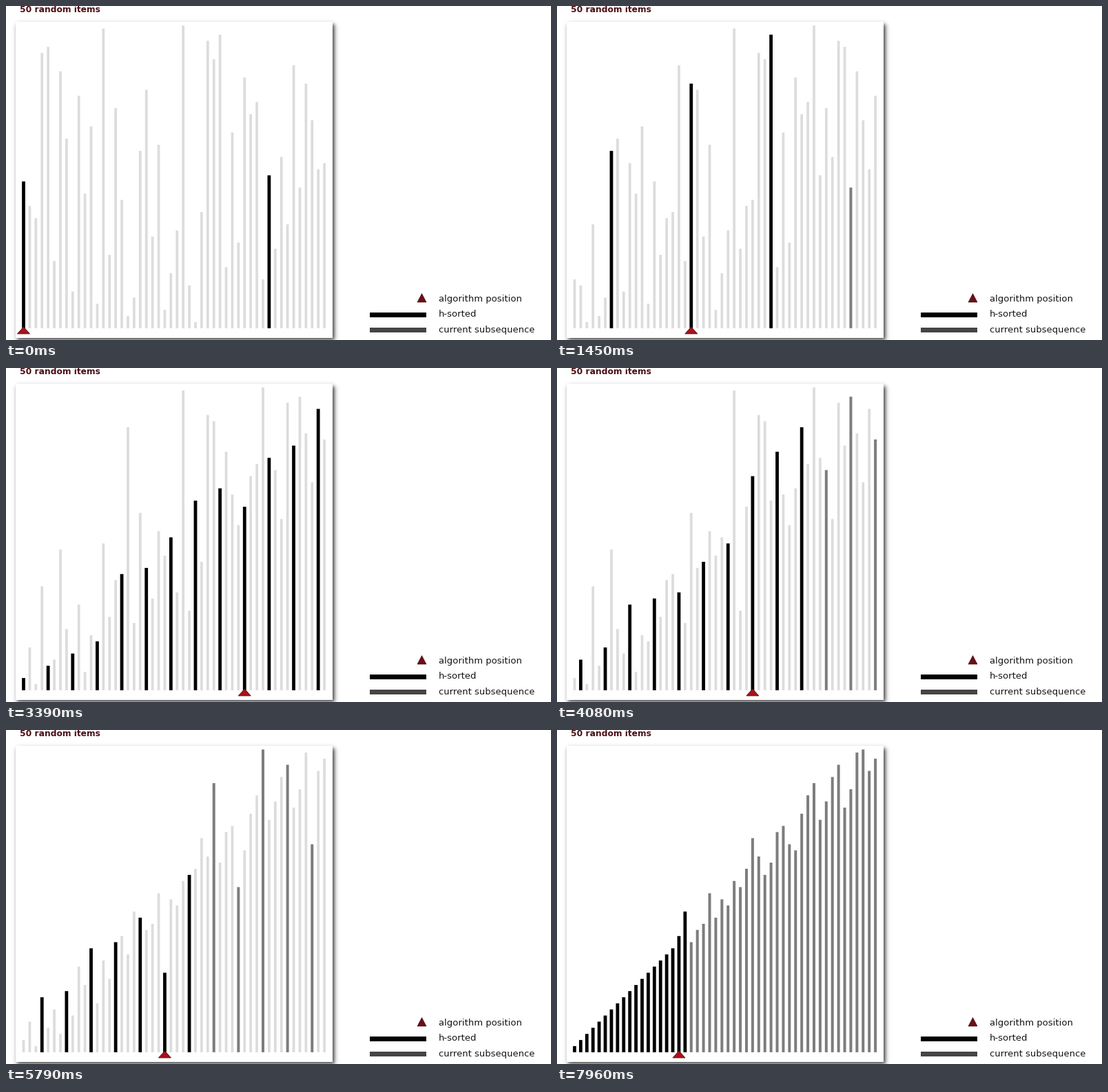
Animation, 791 px wide and 486 px high, one loop 8000 ms. Source, as a matplotlib script:

```python
import numpy as np
import matplotlib.pyplot as plt
from matplotlib.animation import FuncAnimation
from matplotlib.collections import LineCollection

W, H, DPI = 791, 486, 64          # a power of two keeps the pixel size exact
PT = 72 / DPI                     # points per pixel
INTERVAL, FRAMES = 20, 400
FIRST_STEP, STEP = 60, 77.45      # ms

BASE, UNIT = 468.9, 8.9
LIGHT, MID, BLACK = "#dcdcdc", "#7d7d7d", "#000000"
RED, MAROON = "#a8121c", "#5c0d12"

ITEMS = [24, 20, 18, 45, 46, 11, 42, 31, 6, 38, 22, 33, 4, 49, 12, 36, 21,
         2, 5, 29, 39, 15, 30, 3, 9, 16, 50, 7, 1, 19, 47, 44, 48, 10, 32,
         14, 41, 35, 37, 8, 25, 13, 28, 17, 43, 23, 40, 34, 26, 27]
COUNT = len(ITEMS)


def shell_sort(items):
    """Yield (items, gap, newest index, pointer) after every comparison."""
    a = list(items)
    for gap in (40, 13, 4, 1):
        for start in range(gap):
            for i in range(start + gap, len(a), gap):
                for j in range(i, gap - 1, -gap):
                    swap = a[j] < a[j - gap]
                    if swap:
                        a[j], a[j - gap] = a[j - gap], a[j]
                    yield tuple(a), gap, i, j - gap
                    if not swap:
                        break


STATES = list(shell_sort(ITEMS))


def state_at(ms):
    """Two comparisons per step, with short rests between passes."""
    k = max(0, int((ms - FIRST_STEP) // STEP) + 1)
    rests = sum(k > r for r in (30, 36, 81, 82)) + (k == 37)
    return STATES[2 * k - rests]


def bar_x(i):
    return 25.5 + 8.91 * i


def triangle(x, top, bottom, half):
    return [(x - half, bottom), (x + half, bottom), (x, top)]


def soft_box(x0, x1, y0, y1, blur):
    """Opacity of a blurred rectangle over the whole stage."""
    def ramp(n, lo, hi):
        p = np.arange(n) + 0.5
        rise = lambda d: 1 / (1 + np.exp(-1.7 * d / blur))
        return rise(p - lo) * rise(hi - p)
    return np.outer(ramp(H, y0, y1), ramp(W, x0, x1))


fig = plt.figure(figsize=(W / DPI, H / DPI), dpi=DPI, facecolor="white")
ax = fig.add_axes([0, 0, 1, 1])
ax.set_xlim(0, W)
ax.set_ylim(H, 0)
ax.axis("off")

# Panel with its drop shadow
shade = 1 - 0.72 * soft_box(16, 477, 26.5, 486, 3)
shade[23:483, 14:474] = 1
ax.imshow(shade, cmap="gray", vmin=0, vmax=1, extent=(0, W, H, 0),
          aspect="auto", interpolation="nearest", zorder=0)


def label(x, y, text, size, color, weight="normal"):
    ax.text(x, y, text, fontsize=size * PT, color=color, weight=weight,
            family="DejaVu Sans", va="baseline", ha="left")


label(20, 9, "50 random items", 12.3, "#4a1016", "bold")

# Legend
label(628, 430, "algorithm position", 13.1, "#151515")
label(628, 452, "h-sorted", 13.1, "#151515")
label(628, 475, "current subsequence", 13.1, "#151515")
ax.add_patch(plt.Polygon(triangle(603.5, 418.5, 431, 6.5), fc="#6b1014",
                         ec="#3a080a", lw=0.6 * PT))
for y, color in ((449.5, BLACK), (471.3, "#454545")):
    ax.add_patch(plt.Rectangle((528, y - 3.7), 82, 7.4, color=color, lw=0))

bars = LineCollection([], capstyle="butt", snap=False, zorder=2)
ax.add_collection(bars, autolim=False)
pointer = plt.Polygon(triangle(0, 467, 477, 9), fc=RED, ec=MAROON,
                      lw=0.8 * PT, zorder=3)
ax.add_patch(pointer)


def bar_style(i, gap, newest):
    if (i - newest) % gap:
        return LIGHT, 3.7
    return (BLACK, 4.8) if i <= newest else (MID, 4.0)


def draw(frame):
    items, gap, newest, pos = state_at((frame + 0.5) * INTERVAL)
    styles = [bar_style(i, gap, newest) for i in range(COUNT)]
    bars.set_segments([[(bar_x(i), BASE), (bar_x(i), BASE - UNIT * min(v, 49.5))]
                       for i, v in enumerate(items)])
    bars.set_color([color for color, _ in styles])
    bars.set_linewidth([width * PT for _, width in styles])
    pointer.set_xy(triangle(bar_x(pos), 467, 477, 9))
    return bars, pointer


anim = FuncAnimation(fig, draw, frames=FRAMES, interval=INTERVAL,
                     init_func=lambda: draw(0), repeat=True, repeat_delay=0,
                     blit=False)
plt.show()
```
